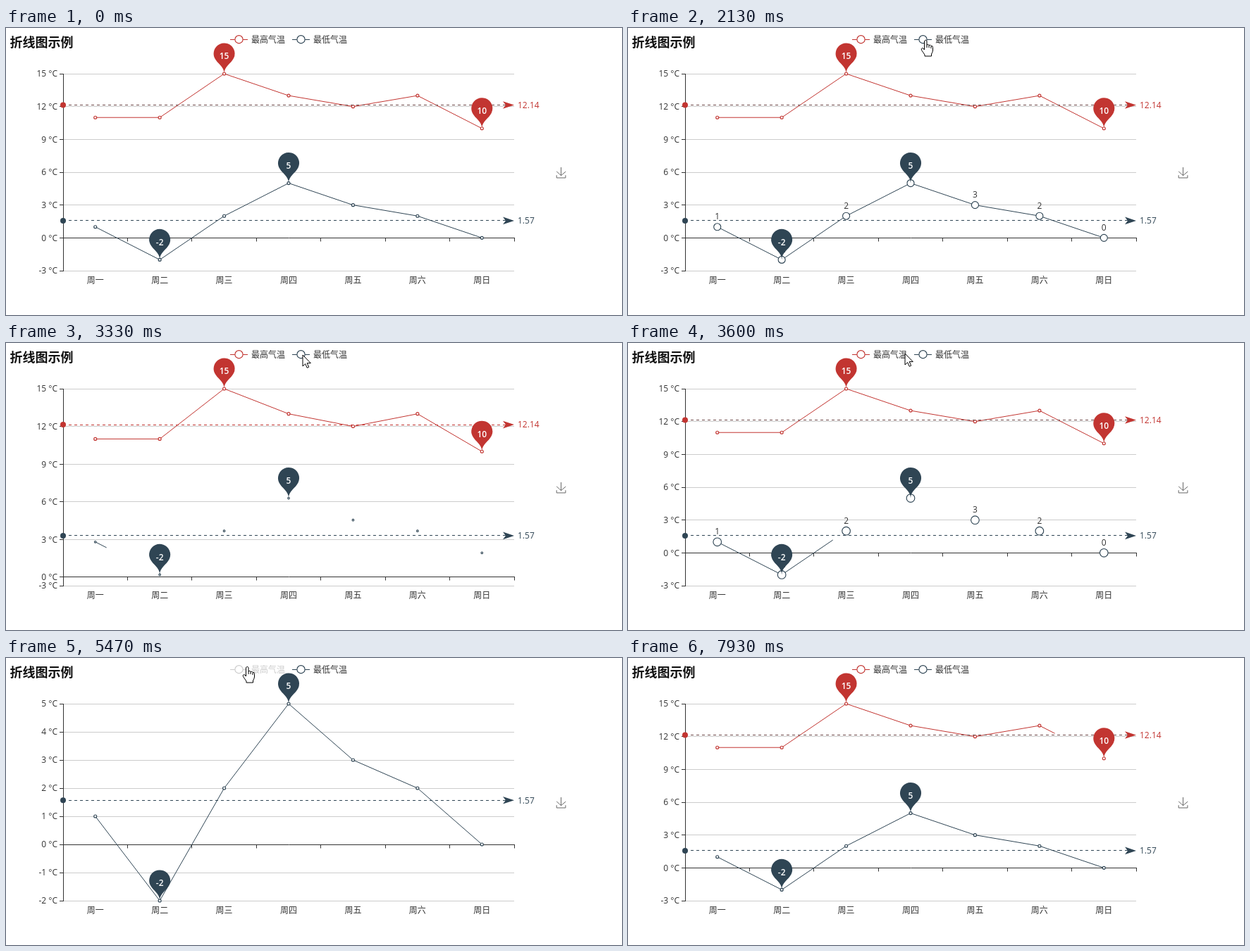
These frames come from a looping animation (874x408 px, 8000 ms). An HTML page with a canvas:

```html
<!DOCTYPE html>
<html lang="zh">
<head>
<meta charset="utf-8">
<title>折线图示例</title>
<style>
  html, body { margin: 0; width: 100%; height: 100%; overflow: hidden; background: #fff; }
  canvas { display: block; }
</style>
</head>
<body>
<canvas id="stage" width="874" height="408"></canvas>
<script>
const ctx = document.getElementById('stage').getContext('2d');
const LOOP = 8000;
const LEFT = 81, RIGHT = 721, TOP = 65, BOTTOM = 345;
const BAND = (RIGHT - LEFT) / 7;
const FONT = '"Open Sans", "Noto Sans CJK SC", "Noto Sans CJK", sans-serif';
const DARK = '#333';
const DAYS = ['周一', '周二', '周三', '周四', '周五', '周六', '周日'];

// hover: [start, end] spans in which the symbols are enlarged and labelled
const high = {
  name: '最高气温', color: '#c23531', data: [11, 11, 15, 13, 12, 13, 10],
  mean: 12.14, pins: [2, 6], legendX: 318, hover: [[3730, 5190], [7400, 7530]]
};
const low = {
  name: '最低气温', color: '#2f4554', data: [1, -2, 2, 5, 3, 2, 0],
  mean: 1.57, pins: [1, 3], legendX: 406, hover: [[1730, 2250], [3530, 3690]]
};

// Axis range and visible series after each legend click
const full = { min: -3, max: 15, step: 3, series: [high, low] };
const highOnly = { min: 0, max: 15, step: 3, series: [high] };
const lowOnly = { min: -2, max: 5, step: 1, series: [low] };
const stages = [
  { at: -5000, view: full },
  { at: 2250, view: highOnly },
  { at: 3302, view: full },
  { at: 5190, view: lowOnly },
  { at: 7058, view: full }
];

// Pointer path: time, x, y, shape of each leg's start
const moves = [
  [1130, 862, 223, 'arrow'], [1200, 812, 122, 'arrow'], [1270, 754, 29, 'arrow'], [1330, 754, 29, ''],
  [1670, 428, 0, 'arrow'], [1730, 422, 17, 'hand'], [3302, 421, 17, 'arrow'],
  [3530, 421, 17, 'arrow'], [3730, 342, 12, 'hand'], [7400, 342, 12, 'hand'],
  [7500, 341, 2, 'hand'], [7530, 341, 2, '']
];

const handShape = new Path2D('M-1.5 1.5Q.5-1 2 1.5V7Q4 5.5 5 7.5Q7 6.3 8 8.5Q10.5 8 10.5 10.5V15' +
  'Q10 18 8.5 20V23H-1V21Q-3 18-5.5 14.5Q-6.5 12-4.5 11.5Q-3 11.5-1.5 14Z');
const knuckles = new Path2D('M2 7V11M5 8V11M8 9V12');
const arrowShape = new Path2D('M0 0V16L3.7 12.6L6.2 18.3L8.7 17.2L6.2 11.6H11.3Z');
const saveIcon = new Path2D('M4.7 22.9L29.3 45.5L54.7 23.4M4.6 43.6V58H53.8V43.6M29.2 45.1V0');

const clamp = k => Math.max(0, Math.min(1, k));
const crisp = v => Math.floor(v) + 0.5;
const cubicOut = k => 1 - (1 - clamp(k)) ** 3;
const elasticOut = k => k <= 0 ? 0 : k >= 1 ? 1 : 2 ** (-10 * k) * Math.sin((k - 0.1) * 5 * Math.PI) + 1;
const dayX = i => LEFT + BAND * (i + 0.5);
const place = (v, view) => BOTTOM - (v - view.min) / (view.max - view.min) * (BOTTOM - TOP);
const hasTick = (v, view) => v >= view.min && v <= view.max && (v - view.min) % view.step === 0;

function line(x1, y1, x2, y2, color) {
  ctx.strokeStyle = color;
  ctx.lineWidth = 1;
  ctx.beginPath();
  ctx.moveTo(x1, y1);
  ctx.lineTo(x2, y2);
  ctx.stroke();
}

function text(str, x, y, color, align = 'left', size = 12, weight = 400) {
  ctx.font = `${weight} ${size}px ${FONT}`;
  ctx.textAlign = align;
  ctx.fillStyle = color;
  ctx.fillText(str, x, y + size * 0.37);
}

function disc(x, y, r, fill, stroke) {
  ctx.beginPath();
  ctx.arc(x, y, r, 0, 2 * Math.PI);
  ctx.fillStyle = fill;
  ctx.fill();
  if (!stroke) return;
  ctx.strokeStyle = stroke;
  ctx.lineWidth = 1.15;
  ctx.stroke();
}

function pin(x, y, value, color) {
  const r = 15, dy = r * r / 35, cy = y - 35 + dy;
  const a = Math.asin(dy / r), dx = r * Math.cos(a);
  const cx = dx - Math.sin(a) * r * 0.6, cpY = cy + dy + Math.cos(a) * r * 0.6;
  ctx.beginPath();
  ctx.arc(x, cy, r, Math.PI - a, 2 * Math.PI + a);
  ctx.bezierCurveTo(x + cx, cpY, x, y - r * 0.7, x, y);
  ctx.bezierCurveTo(x, y - r * 0.7, x - cx, cpY, x - dx, cy + dy);
  ctx.fillStyle = color;
  ctx.fill();
  text(value, x, y - 25, '#fff', 'center', 12, 600);
}

function drawAxes(view, yOf) {
  const zero = crisp(yOf(0));
  for (let v = view.min; v <= view.max; v += view.step) {
    const y = crisp(yOf(v));
    if (v) line(LEFT, y, RIGHT, y, '#ccc');
    line(LEFT - 5, y, LEFT, y, DARK);
    text(v + ' °C', LEFT - 8, yOf(v), DARK, 'right');
  }
  line(crisp(LEFT), TOP, crisp(LEFT), BOTTOM + 1, DARK);
  line(LEFT, zero, RIGHT + 1, zero, DARK);
  for (let i = 0; i <= 7; i++) {
    const x = crisp(LEFT + BAND * i);
    line(x, zero, x, zero + 5, DARK);
  }
  DAYS.forEach((day, i) => text(day, dayX(i), 359, DARK, 'center'));
}

function symbolRadius(s, t) {
  const span = s.hover.filter(h => t >= h[0]).pop();
  if (!span) return 2;
  return t < span[1]
    ? 2 + 3 * elasticOut((t - span[0]) / 400)
    : 5 - 3 * elasticOut((t - span[1]) / 400);
}

function drawSeries(s, t, age, yOf) {
  const points = s.data.map((v, i) => [dayX(i), yOf(v)]);
  ctx.save();
  ctx.beginPath();
  ctx.rect(dayX(0) - 1, 0, 1 + 6 * BAND * clamp(age / 1000) + (age >= 1000 ? 1 : 0), 408);
  ctx.clip();
  ctx.beginPath();
  points.forEach(p => ctx.lineTo(...p));
  ctx.strokeStyle = s.color;
  ctx.lineWidth = 1;
  ctx.stroke();
  ctx.restore();

  const r = Math.max(0, symbolRadius(s, t) * cubicOut(age / 100));
  const hovered = s.hover.some(h => t >= h[0] && t < h[1]);
  points.forEach(([x, y], i) => {
    disc(x, y, r, '#fff', s.color);
    if (hovered) text(s.data[i], x, y - 15, DARK, 'center');
  });
}

function drawMarks(s, yOf) {
  const y = yOf(s.mean), settled = Math.abs(y - place(s.mean, full)) < 0.5;
  ctx.setLineDash([4, 4]);
  line(LEFT, crisp(y), RIGHT, crisp(y), s === high && settled ? '#704b4b' : s.color);
  ctx.setLineDash([]);
  disc(LEFT, y, 4, s.color);
  ctx.beginPath();
  ctx.moveTo(RIGHT, y);
  ctx.lineTo(RIGHT - 16, y - 5.33);
  ctx.lineTo(RIGHT - 12, y);
  ctx.lineTo(RIGHT - 16, y + 5.33);
  ctx.fill();
  text(s.mean, RIGHT + 5, y, s.color);
  s.pins.forEach(i => pin(dayX(i), yOf(s.data[i]), s.data[i], s.color));
}

function drawLegend(s, on) {
  const color = on ? s.color : '#ccc', x = s.legendX;
  line(x, 16.5, x + 25, 16.5, color);
  disc(x + 12.5, 16.2, 5.6, '#fff', color);
  text(s.name, x + 30, 16.5, on ? DARK : '#ccc');
}

function drawSaveIcon() {
  ctx.save();
  ctx.translate(780, 198);
  ctx.scale(15 / 58, 15 / 58);
  ctx.strokeStyle = '#666';
  ctx.lineWidth = 58 / 15;
  ctx.stroke(saveIcon);
  ctx.restore();
}

function drawPointer(t) {
  const i = moves.findLastIndex(m => t >= m[0]);
  if (i < 0 || !moves[i][3]) return;
  const [t0, x0, y0, shape] = moves[i];
  const [t1, x1, y1, next] = moves[i + 1];
  const k = next ? (t - t0) / (t1 - t0) : 0;
  // The pointer rests on a legend item unless it is travelling
  const still = t0 === 1730;
  ctx.save();
  ctx.translate(Math.round(still ? x0 : x0 + (x1 - x0) * k), Math.round(still ? y0 : y0 + (y1 - y0) * k));
  const path = shape === 'hand' ? handShape : arrowShape;
  ctx.fillStyle = '#fff';
  ctx.strokeStyle = '#000';
  ctx.lineWidth = 1;
  ctx.fill(path);
  ctx.stroke(path);
  if (shape === 'hand') ctx.stroke(knuckles);
  ctx.restore();
}

function draw(t) {
  const n = stages.findLastIndex(s => t >= s.at);
  const { at, view } = stages[n];
  const before = n ? stages[n - 1].view : view;
  const p = cubicOut((t - at) / 300);
  const target = v => place(v, view);
  const moving = v => place(v, before) + (target(v) - place(v, before)) * p;
  const tickY = v => (hasTick(v, before) ? moving : target)(v);

  ctx.fillStyle = '#fff';
  ctx.fillRect(0, 0, 874, 408);
  drawAxes(view, tickY);
  const shown = view.series.map(s => {
    const kept = before.series.includes(s);
    return { s, age: kept ? 1000 : t - at, yOf: kept ? moving : target };
  });
  shown.forEach(({ s, age, yOf }) => drawSeries(s, t, age, yOf));
  shown.forEach(({ s, yOf }) => drawMarks(s, yOf));
  text('折线图示例', 5.5, 20, '#111', 'left', 18, 700);
  [high, low].forEach(s => drawLegend(s, view.series.includes(s)));
  // A pin may reach over the legend row
  drawSaveIcon();
  drawPointer(t);
}

const start = performance.now();
function frame() {
  draw((performance.now() - start) % LOOP);
  requestAnimationFrame(frame);
}
frame();
</script>
</body>
</html>
```
